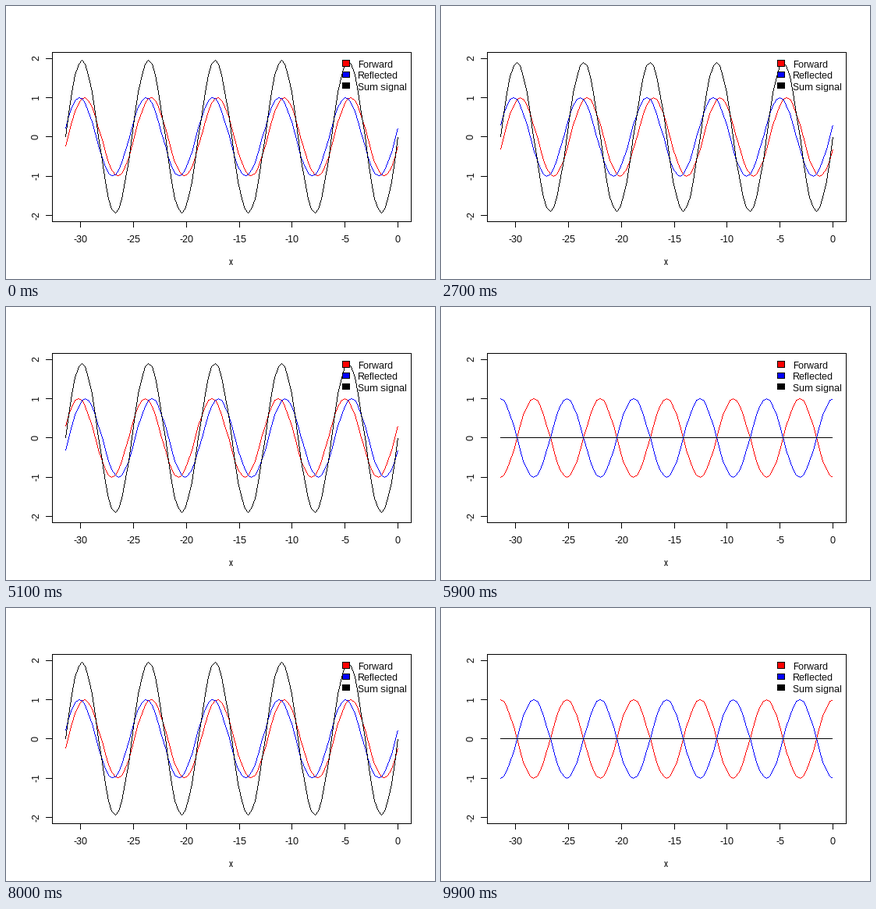
Animation of 550x350 px, one loop 10 s. Source, as a matplotlib script:

```python
import numpy as np
import matplotlib.pyplot as plt
from matplotlib.animation import FuncAnimation
from matplotlib.patches import PathPatch, Rectangle
from matplotlib.path import Path

W, H, DPI = 550, 350, 100
FRAMES, INTERVAL = 100, 100
PX = 72 / DPI                      # one pixel in points
STEP = 3 * np.pi / 40              # phase advance per frame

plt.rcParams.update({
    "font.family": "Liberation Sans",
    "font.size": 8.65,
    "text.hinting": "default",
    "text.hinting_factor": 1,
    "path.simplify": False,
})

# Plot region in pixels, y pointing down
LEFT, RIGHT, TOP, BOTTOM = 59.04, 519.76, 59.04, 276.56
SPAN = 10 * np.pi
X_SCALE = (RIGHT - LEFT) / (1.08 * SPAN)
Y_SCALE = (BOTTOM - TOP) / (1.08 * 4)
X_ZERO = RIGHT - 0.04 * SPAN * X_SCALE
Y_ZERO = (TOP + BOTTOM) / 2

fig = plt.figure(figsize=(W / DPI, H / DPI), dpi=DPI, facecolor="white")
ax = fig.add_axes([0, 0, 1, 1])
ax.set_xlim(0, W)
ax.set_ylim(H, 0)
ax.axis("off")


def to_x(x):
    return X_ZERO + X_SCALE * x


def to_y(y):
    return Y_ZERO - Y_SCALE * y


def center(v):
    """Middle of the pixel that holds v."""
    return np.floor(v) + 0.5


def tick(xs, ys):
    ax.plot(center(np.array(xs)), center(np.array(ys)), color="black",
            lw=PX, antialiased=False, snap=False, zorder=1)


def box(x0, y0, x1, y1, fill="none", z=1):
    x0, y0, x1, y1 = center(np.array([x0, y0, x1, y1]))
    ax.add_patch(Rectangle((x0, y0), x1 - x0, y1 - y0, facecolor=fill,
                           edgecolor="black", lw=PX, antialiased=False,
                           snap=False, zorder=z))


def label(x, y, text, **kw):
    ax.text(x, y, text, ha="left", va="baseline", color="black", zorder=6, **kw)


def half_width(number):
    """Half the advance of a tick label: digits 7 px, minus sign 4 px."""
    return (7 * len(number) - 3 * number.count("-")) / 2


def pixel_path(xs, ys):
    """Polyline as unit squares, one pixel per step along the longer axis."""
    pts = np.floor(np.column_stack([xs, ys]))
    delta = np.diff(pts, axis=0)
    count = np.abs(delta).max(axis=1).astype(int)
    seg = np.repeat(np.arange(len(count)), count)
    k = np.arange(count.sum()) - np.repeat(np.cumsum(count) - count, count)
    cells = np.floor(pts[seg] + delta[seg] * (k / count[seg])[:, None] + 0.5)
    corners = np.array([[0, 0], [1, 0], [1, 1], [0, 1]])
    return Path.make_compound_path_from_polys(cells[:, None] + corners)


# Frame, ticks and axis labels
box(LEFT, TOP, RIGHT, BOTTOM)
for v in range(-30, 1, 5):
    x, text = to_x(v), str(v)
    tick([x, x], [BOTTOM, BOTTOM + 7.2])
    label(np.floor(x - half_width(text)), 303, text)
for v in range(-2, 3):
    y, text = to_y(v), str(v)
    tick([LEFT - 7.2, LEFT], [y, y])
    label(42, np.floor(y + half_width(text)), text,
          rotation=90, rotation_mode="anchor")
label(286, 332, "x")

# Waves
xs = np.linspace(-SPAN, 0, 101)
px = to_x(xs)
waves = [ax.add_patch(PathPatch(pixel_path(px, to_y(0 * xs)), facecolor=color,
                                edgecolor="none", lw=0, snap=False, zorder=z))
         for z, color in enumerate(("red", "blue", "black"), start=2)]

# Legend
legend = (("Forward", "red", 79), ("Reflected", "blue", 93),
          ("Sum signal", "black", 108))
for i, (name, color, base) in enumerate(legend):
    mid = TOP + 14.4 * (i + 1)
    box(431.5, mid - 3.6, 440.1, mid + 3.6, color, z=5)
    label(451, base, name)


def update(n):
    phase = STEP * (n + 1)
    a, b = np.sin(xs - phase), np.sin(xs + phase)
    for wave, ys in zip(waves, (a, b, a + b)):
        wave.set_path(pixel_path(px, to_y(ys)))
    return waves


anim = FuncAnimation(fig, update, frames=FRAMES, interval=INTERVAL,
                     repeat=True, repeat_delay=0, blit=False)
plt.show()
```
